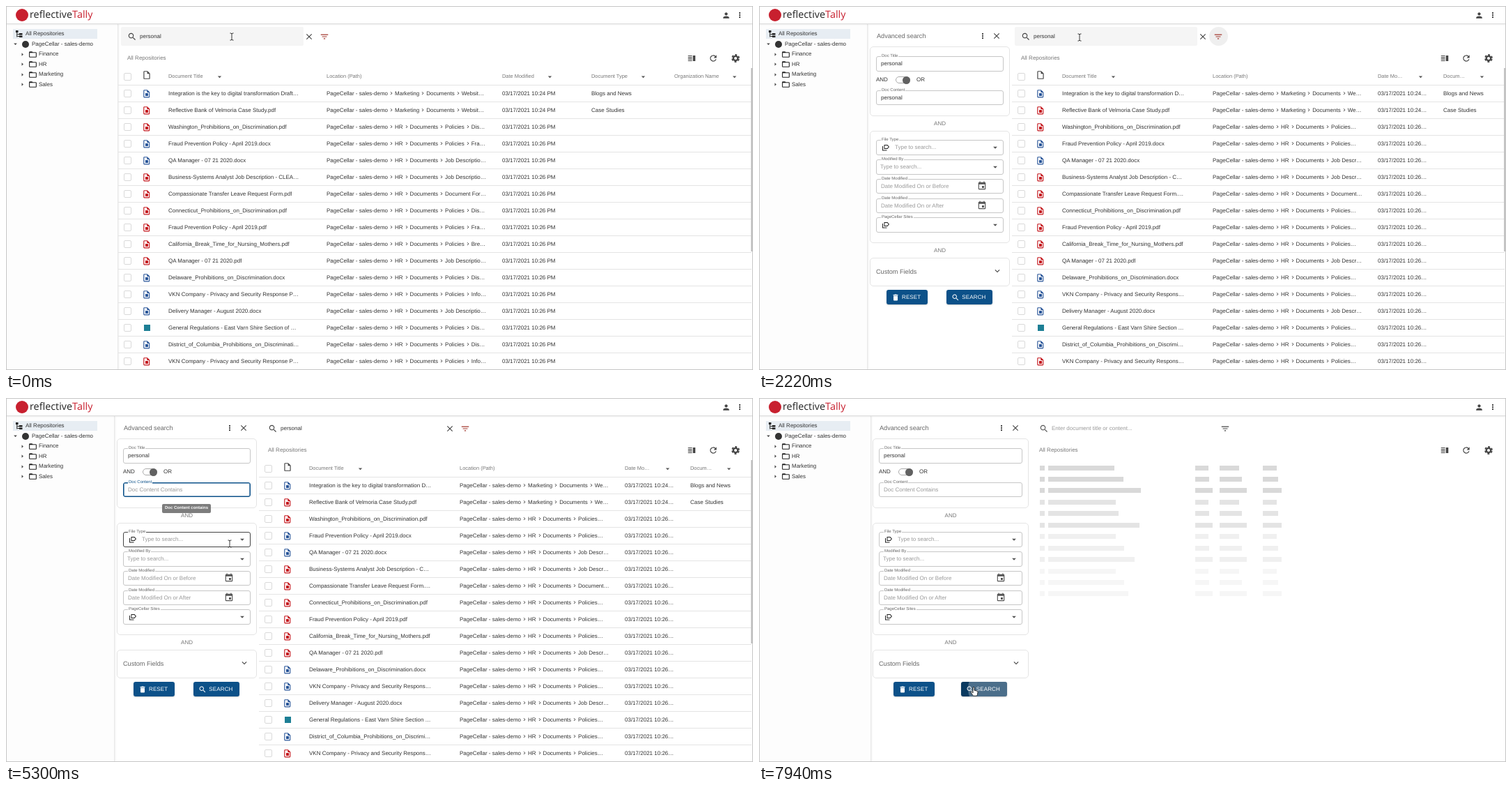
An HTML page that plays this animation: 1072x522 px, repeating every 8000 ms.

```html
<!DOCTYPE html>
<html lang="en">
<head>
<meta charset="utf-8">
<title>Repository search</title>
<style>
html, body { margin: 0; width: 100%; height: 100%; overflow: hidden; background: #fff; }
#stage {
  position: relative; width: 1072px; height: 522px; overflow: hidden; background: #fff;
  font: 8px/12px "Liberation Sans", Arial, sans-serif; color: #333;
  text-rendering: geometricPrecision;
}
#stage::after { content: ""; position: absolute; inset: 0; border: 1px solid #c6c6c6; }
#stage div, #stage svg, .t { position: absolute; box-sizing: border-box; }
.t { white-space: nowrap; overflow: hidden; text-overflow: ellipsis; }
.layer { inset: 0; }
svg { overflow: visible; }
#stage svg.sep { position: static; width: 10px; height: 8px; vertical-align: -1.5px; fill: none; stroke: #333; stroke-width: .9; }
.head { font-size: 7.45px; color: #777; }
.grey { color: #777; }
.hint { color: #999; }
.big { font-size: 9.15px; color: #666; }
.brand { font: 14.4px/18px "Open Sans", sans-serif; color: #222; }
.brand b { font-weight: 400; color: #c8202f; }
#bar { left: 0; top: 0; width: 1072px; height: 26px; background: #fff; border-bottom: 1px solid #dcdcdc; box-shadow: 0 1px 2px #0001; }
#side { left: 0; top: 26px; height: 496px; background: #fdfdfd; border-right: 1px solid #e8e8e8; box-shadow: 1px 0 2px #0001; }
#picked { left: 10px; top: 33px; width: 121px; height: 14px; background: #e7edf3; }
.line { right: 2px; height: 1px; background: #e4e4e4; }
.check { width: 11px; height: 11px; border: 1px solid #d9d9d9; border-radius: 2px; background: #fff; }
.field { top: 30px; width: 262px; height: 27px; background: #f5f5f5; border-radius: 2px; }
.ripple { top: 30px; width: 27px; height: 27px; border-radius: 50%; background: #efefef; }
.box { left: 0; right: 0; border: 1px solid #e4e4e4; border-radius: 5px; background: #fff; }
.input { left: 9px; right: 9px; height: 21.5px; border: 1px solid #c6c6c6; border-radius: 3px; }
.label { z-index: 1; margin-top: 2px; padding: 0 1px; font-size: 6px; line-height: 8px; color: #666; background: #fff; }
.mid { left: 0; right: 0; text-align: center; color: #777; }
.btn { top: 407px; height: 21px; border-radius: 3px; background: #0c5189; color: #fff; box-shadow: 0 1px 2px #0003; overflow: hidden; }
.btn .t { letter-spacing: .15px; }
.tip { height: 13px; border-radius: 2px; background: #666; color: #fff; font: bold 6px/13px "Liberation Sans", Arial, sans-serif; text-align: center; white-space: nowrap; }
.caret { width: 1px; height: 9px; background: #222; }
.bone { height: 7px; background: #d9d9d9; }
#wave { left: 10px; top: -27px; width: 74px; height: 74px; border-radius: 50%; background: #fff4; }
#cursor { left: 0; top: 0; }
#glow { left: -8.5px; top: -8.5px; width: 17px; height: 17px; border-radius: 50%; background: rgba(246, 230, 20, .7); }
</style>
</head>
<body>
<div id="stage"></div>
<script>
const icons = {
  person: 'M12 12c2.2 0 4-1.8 4-4s-1.8-4-4-4-4 1.8-4 4 1.8 4 4 4zm0 2c-2.7 0-8 1.3-8 4v2h16v-2c0-2.7-5.3-4-8-4z',
  dots: 'M10 4h4v4h-4zM10 10h4v4h-4zM10 16h4v4h-4z',
  search: 'M15.5 14h-.8l-.3-.3A6.5 6.5 0 1 0 13.7 14.4l.3.3v.8l5 5 1.5-1.5zm-6 0a4.5 4.5 0 1 1 0-9 4.5 4.5 0 0 1 0 9z',
  close: 'M19 6.4L17.6 5 12 10.6 6.4 5 5 6.4 10.6 12 5 17.6 6.4 19 12 13.4 17.6 19 19 17.6 13.4 12z',
  filter: 'M10 18h4v-2h-4zM3 6v2h18V6zM6 13h12v-2H6z',
  refresh: 'M17.6 6.4A8 8 0 1 0 19.7 14h-2.1A6 6 0 1 1 16.2 7.8L13 11h7V4z',
  folder: 'M20 6h-8l-2-2H4a2 2 0 0 0-2 2v12a2 2 0 0 0 2 2h16a2 2 0 0 0 2-2V8a2 2 0 0 0-2-2zm0 12H4V8h16z',
  trash: 'M6 19a2 2 0 0 0 2 2h8a2 2 0 0 0 2-2V7H6zM19 4h-3.5l-1-1h-5l-1 1H5v2h14z',
  date: 'M17 12h-5v5h5zM16 1v2H8V1H6v2H5a2 2 0 0 0-2 2v14a2 2 0 0 0 2 2h14a2 2 0 0 0 2-2V5a2 2 0 0 0-2-2h-1V1zm3 18H5V8h14z',
  more: 'M16.6 8.6L12 13.2 7.4 8.6 6 10l6 6 6-6z',
  down: 'M7 10l5 5 5-5z',
  right: 'M10 7l5 5-5 5z',
  file: 'M14 2H6a2 2 0 0 0-2 2v16a2 2 0 0 0 2 2h12a2 2 0 0 0 2-2V8zM18 20H6V4h7v5h5z',
  list: 'M3 5h10v2H3zM3 9h10v2H3zM3 13h10v2H3zM3 17h10v2H3zM15 5h6v14h-6z',
  tree: 'M2 2h7v6H2zM4.500 8h2v13h-2zM6 12h6v2H6zM6 18h6v2H6zM12 10h9v5h-9zM12 17h9v5h-9z',
  tag: 'M7 4h10l5 6-5 6H7zM9 6v8h7l3.500-4L16 6zM2 8h2v11h11v2H2z'
};

const svg = (style, body) => `<svg viewBox="0 0 24 24" style="${style}">${body}</svg>`;
const place = (x, y, size, side = 'left') => `${side}:${x - size / 2}px;top:${y - size / 2}px;width:${size}px;height:${size}px`;
const ic = (name, x, y, size = 14, fill = '#444', side) =>
  svg(place(x, y, size, side), `<path fill="${fill}" fill-rule="evenodd" d="${icons[name]}"/>`);
const txt = (x, y, s, cls = '', w) =>
  `<span class="t ${cls}" style="left:${x}px;top:${y - 6}px;${w ? `max-width:${w}px` : ''}">${s}</span>`;
const div = (cls, style, body = '', id = '') => `<div ${id && `id="${id}"`} class="${cls}" style="${style}">${body}</div>`;
const dot = (x, y, r, color) => div('', `${place(x, y, 2 * r)};border-radius:50%;background:${color}`);
const square = (x, y, s, color) => div('', `${place(x, y, s)};background:${color}`);

// Frame of the app
const gear = svg(place(1046.5, 75, 14),
  '<g fill="none" stroke="#444"><circle cx="12" cy="12" r="5.500" stroke-width="4"/><circle cx="12" cy="12" r="8.600" stroke-width="3" stroke-dasharray="5 4.006" transform="rotate(13.300 12 12)"/></g>');

const chrome = div('', 'width:155px', '', 'side') +
  div('', '', dot(22.5, 12.5, 9, '#c8202f') + txt(34, 9.5, 'reflective<b>Tally</b>', 'brand') +
    ic('person', 1033, 13, 13) + ic('dots', 1053, 13, 12), 'bar') +
  div('', '', '', 'picked') + ic('tree', 19, 40, 12, '#222') + txt(28, 40, 'All Repositories') +
  ic('down', 13.5, 54.5, 11) + dot(28, 54.5, 5, '#333') + txt(37, 54.5, 'PageCellar - sales-demo') +
  ['Finance', 'HR', 'Marketing', 'Sales'].map((s, i) => {
    const y = 69 + 14.5 * i;
    return ic('right', 23, y, 11) + ic('folder', 38, y, 13, '#222') + txt(47, y, s);
  }).join('');

const tools = ic('list', 983.5, 75) + ic('refresh', 1015, 75) + gear;

// Result table
const policies = s => ['HR', 'Documents', 'Policies', s];
const site = ['Marketing', 'Documents', 'Website Content'];
const jobs = ['HR', 'Documents', 'Job Descriptions Archive'];
const bias = policies('Discrimination'), fraud = policies('Fraternization'), info = policies('Information');
const rows = [
  ['w', 'Integration is the key to digital transformation Draft.docx', site, 'Blogs and News'],
  ['p', 'Reflective Bank of Velmoria Case Study.pdf', site, 'Case Studies'],
  ['p', 'Washington_Prohibitions_on_Discrimination.pdf', bias],
  ['w', 'Fraud Prevention Policy - April 2019.docx', fraud],
  ['w', 'QA Manager - 07 21 2020.docx', jobs],
  ['p', 'Business-Systems Analyst Job Description - CLEAN.pdf', jobs],
  ['p', 'Compassionate Transfer Leave Request Form.pdf', ['HR', 'Documents', 'Document Forms']],
  ['p', 'Connecticut_Prohibitions_on_Discrimination.pdf', bias],
  ['p', 'Fraud Prevention Policy - April 2019.pdf', fraud],
  ['p', 'California_Break_Time_for_Nursing_Mothers.pdf', policies('Breaks')],
  ['p', 'QA Manager - 07 21 2020.pdf', jobs],
  ['w', 'Delaware_Prohibitions_on_Discrimination.docx', bias],
  ['w', 'VKN Company - Privacy and Security Response Plan.docx', info],
  ['w', 'Delivery Manager - August 2020.docx', jobs],
  ['h', 'General Regulations - East Varn Shire Section of Housing.html', bias],
  ['w', 'District_of_Columbia_Prohibitions_on_Discrimination.docx', bias],
  ['p', 'VKN Company - Privacy and Security Response Plan.pdf', info]
];
const sep = '<svg class="sep" viewBox="0 0 10 8"><path d="M4 2.200l1.900 1.900-1.900 1.900"/></svg>';
const fileIcon = (kind, x, y) => {
  if (kind === 'h') return square(x, y, 9, '#1d7f95');
  const color = kind === 'w' ? '#2a5699' : '#c4161c';
  return ic('file', x, y, 13.5, color) + square(x, y + 1.5, 4, color);
};

function view(id, dx, heads, titleW, pathW, dateW) {
  const [, path, date, type] = heads.map(h => h[1]);
  const check = y => div('check', `left:${169 + dx}px;top:${y - 5.5}px`);
  return div('layer', '',
    div('field', `left:${165 + dx}px`) + div('ripple', `left:${443.5 + dx}px`) +
    ic('search', 181 + dx, 44) + txt(192 + dx, 44, 'personal') +
    ic('close', 435 + dx, 44) + ic('filter', 457 + dx, 44, 14, '#a3382f') +
    txt(174 + dx, 75, 'All Repositories', 'grey') +
    check(101) + ic('file', 202 + dx, 99, 14) +
    heads.map(([s, x, w, arrow]) => txt(x, 101, s, 'head', w) + (arrow ? ic('down', arrow, 101, 13, '#555') : '')).join('') +
    rows.map(([kind, title, trail, docType], i) => {
      const y = 125.5 + 24 * i;
      return div('line', `left:${161 + dx}px;top:${113 + 24 * i}px`) + check(y) + fileIcon(kind, 202 + dx, y) +
        txt(233 + dx, y, title, '', titleW) +
        txt(path, y, ['PageCellar - sales-demo', ...trail].join(sep), '', pathW) +
        txt(date, y, `03/17/2021 10:${i < 2 ? 24 : 26} PM`, '', dateW) + (docType ? txt(type, y, docType) : '');
    }).join('') +
    div('', 'left:1069px;top:89px;width:3px;height:263px;background:#c4c4c4'), id);
}
const wide = view('wide', 0, [['Document Title', 233, 80, 306], ['Location (Path)', 460, 90], ['Date Modified', 712, 60, 780],
  ['Document Type', 840, 60, 914], ['Organization Name', 959, 75, 1045]], 188.2, 229.5, 90);
const narrow = view('narrow', 202, [['Document Title', 435, 80, 508], ['Location (Path)', 651, 90], ['Date Modified', 888, 37, 949],
  ['Document Type', 982, 33, 1037]], 176.3, 215, 71);

// Loading placeholder
const bones = [95, 108, 133, 97, 101, 131, 97, 109, 124, 97, 109, 115];
const loading = div('layer', '',
  ic('search', 409, 44, 14, '#555') + txt(420, 44, 'Enter document title or content...', 'hint') +
  ic('filter', 669, 44) + txt(402, 75, 'All Repositories', 'grey') +
  bones.map((w, i) => {
    const k = i % 3, fade = [1, .7, .4, .25][Math.floor(i / 3)];
    return [[403, 7], [415, w], [626, [19, 20, 25][k]], [661, [28, 32, 39][k]], [723, [20, 22, 27][k]]]
      .map(([x, bw]) => div('bone', `left:${x}px;top:${96.5 + 16.45 * i}px;width:${bw}px;opacity:${fade}`)).join('');
  }).join(''), 'loading');

// Advanced search panel, laid out from its own left and right edges
const input = (y, label, body, id) => div('input', `top:${y - 11}px`, '', id) + txt(16, y - 11, label, 'label') + body;
const box = (y1, y2) => div('box', `top:${y1}px;height:${y2 - y1}px`);
const drop = y => ic('down', 21, y, 14, '#555', 'right');
const cal = y => ic('date', 40, y - .5, 14, '#555', 'right');
const button = (at, w, icon, s, id, extra = '') => div('btn', `left:${at}%;width:${w}px;margin-left:${-w / 2}px`,
  extra + ic(icon, 13, 10.5, 12, '#fff') + txt(22, 10.5, s), id);

const panel = div('', 'top:0;height:522px',
  txt(10, 42.5, 'Advanced search', 'big') + ic('dots', 39, 42.5, 12, '#444', 'right') + ic('close', 19, 42.5, 14, '#444', 'right') +
  box(58, 158) +
  input(83, 'Doc Title', txt(16, 83, 'personal')) +
  txt(9, 106, 'AND') + div('', 'left:37px;top:101px;width:21px;height:10px;border:1px solid #aaa;border-radius:5px') +
  dot(52, 106, 5.5, '#616161') + txt(67, 106, 'OR') +
  input(131.5, 'Doc Content', '', 'content') +
  txt(16, 131.5, '<span id="typed">personal</span>') + txt(16, 131.5, '<span id="empty" class="hint">Doc Content Contains</span>') +
  div('', 'inset:0', ic('close', 20, 132, 12, '#444', 'right'), 'clear') + div('caret', 'left:16px;top:127px', '', 'caret2') +
  div('mid', 'top:162.5px', 'AND') +
  box(179, 340) +
  input(203, 'File Type', ic('tag', 23, 203, 12, '#222') + txt(36, 203, 'Type to search...', 'hint') + drop(203), 'kind') +
  input(231, 'Modified By', txt(15, 231, 'Type to search...', 'hint') + drop(231)) +
  input(258.5, 'Date Modified', txt(16, 258.5, 'Date Modified On or Before', 'hint') + cal(258.5)) +
  input(286.5, 'Date Modified', txt(16, 286.5, 'Date Modified On or After', 'hint') + cal(286.5)) +
  input(314, 'PageCellar Sites', ic('tag', 23, 314, 12, '#222') + drop(314)) +
  div('mid', 'top:345px', 'AND') +
  box(361, 402) + txt(9, 381, 'Custom Fields', 'big') + ic('more', 18, 380, 14, '#444', 'right') +
  button(26.6, 59, 'trash', 'RESET') + button(71.3, 66, 'search', 'SEARCH', 'go', div('', '', '', 'wave')), 'panel');

const overlay =
  div('tip', 'left:428px;top:65px;width:58px', 'Advanced Search', 'tip1') +
  div('tip', 'left:224px;top:152px;width:70px', 'Doc Content contains', 'tip2') +
  div('caret', 'left:223px;top:39px', '', 'caret1') +
  div('', '', div('', '', '', 'glow') + `<svg width="1" height="1" fill="#fff" stroke="#222" stroke-width=".9">
    <path id="beam" fill="none" d="M-2.500-5h1.500l1 1 1-1h1.500M0-4v8M-2.500 5h1.500l1-1 1 1h1.500"/>
    <path id="arrow" d="M0 0v11l2.600-2.300 1.600 3.700 1.600-.7-1.600-3.600h3.400z"/>
    <path id="hand" d="M-1 8V0q1-1.600 2 0v4.200l4 1q1.200.3 1 1.600l-.6 4q-.3 1.400-1.600 1.400h-3.400q-1 0-1.600-.8l-2.900-4.600q.4-1.600 1.800-.6z"/></svg>`, 'cursor');

document.getElementById('stage').innerHTML = chrome + wide + narrow + loading + tools + panel + overlay;

// Held states over an 8 s loop; times in ms
let css = '', count = 0;
function track(sel, steps) {
  const name = 'a' + count++;
  const frames = Object.entries(steps).map(([ms, rule]) => `${ms / 80}%{${rule}}`).join('');
  css += `@keyframes ${name}{${frames}}${sel}{animation:${name} 8s step-end infinite}`;
}
// Starts hidden and flips at each time given
function show(sel, ...flips) {
  const steps = { 0: 'opacity:0' };
  flips.forEach((ms, i) => { steps[ms] = `opacity:${1 - i % 2}`; });
  track(sel, steps);
}
const at = (x, y) => `transform:translate(${x}px,${y}px)`;
const edge = (color, w = 0) => `border-color:${color};box-shadow:inset 0 0 0 ${w}px ${color}`;

show('#wide', 0, 2020);
show('#narrow', 2020, 7940);
show('#loading', 7940);
track('#side', { 0: 'width:161px', 2020: 'width:156px', 7940: 'width:161px' });
track('#panel', {
  0: 'opacity:0;left:159px;width:201px',
  2020: 'opacity:1;left:159px;width:201px',
  7940: 'opacity:1;left:163px;width:224px'
});
show('#wide .field', 0, 410);
show('#wide .ripple', 410, 2020);
show('#narrow .field', 2220, 2840);
show('#narrow .ripple', 2020, 3050);
show('#tip1', 620, 2020);
track('#tip2', { 0: 'opacity:0', 3460: 'opacity:1', 5300: 'opacity:.85', 5500: 'opacity:0' });
show('#caret1', 620, 1010);
show('#caret2', 3680, 4280, 4900, 5300, 5910, 6520, 6920, 7540);
show('#typed', 0, 3680);
show('#empty', 3680);
show('#clear', 3260, 3680);
track('#content', { 0: edge('#c6c6c6'), 3260: edge('#444'), 3680: edge('#0c5189', .6), 7540: edge('#c6c6c6') });
track('#content + .label', { 0: 'color:#666', 3680: 'color:#0c5189', 7540: 'color:#666' });
track('#kind', { 0: edge('#c6c6c6'), 5300: edge('#444'), 5500: edge('#c6c6c6') });
track('#go', { 0: 'background:#0c5189', 6320: 'background:#0b4674', 6520: 'background:#0a3a60' });
show('#wave', 7940);
track('#cursor', {
  0: at(324, 44), 200: at(398, 46), 410: at(459, 46), 2020: at(460, 45),
  2840: at(424, 72), 3050: at(372, 108), 3260: at(340, 132), 4080: at(338, 131),
  5300: at(321, 209), 5500: at(316, 268), 5700: at(312, 332), 5910: at(310, 385),
  6110: at(309, 403), 6320: at(308, 415)
});
show('#beam', 0, 410, 2020, 2840, 4080, 5700);
show('#arrow', 2840, 3260, 5700, 6320);
show('#hand', 410, 2020, 3260, 4080, 6320);
show('#glow', 1620, 1820, 3460, 3680, 7540, 7940);

document.head.append(Object.assign(document.createElement('style'), { textContent: css }));
</script>
</body>
</html>
```
